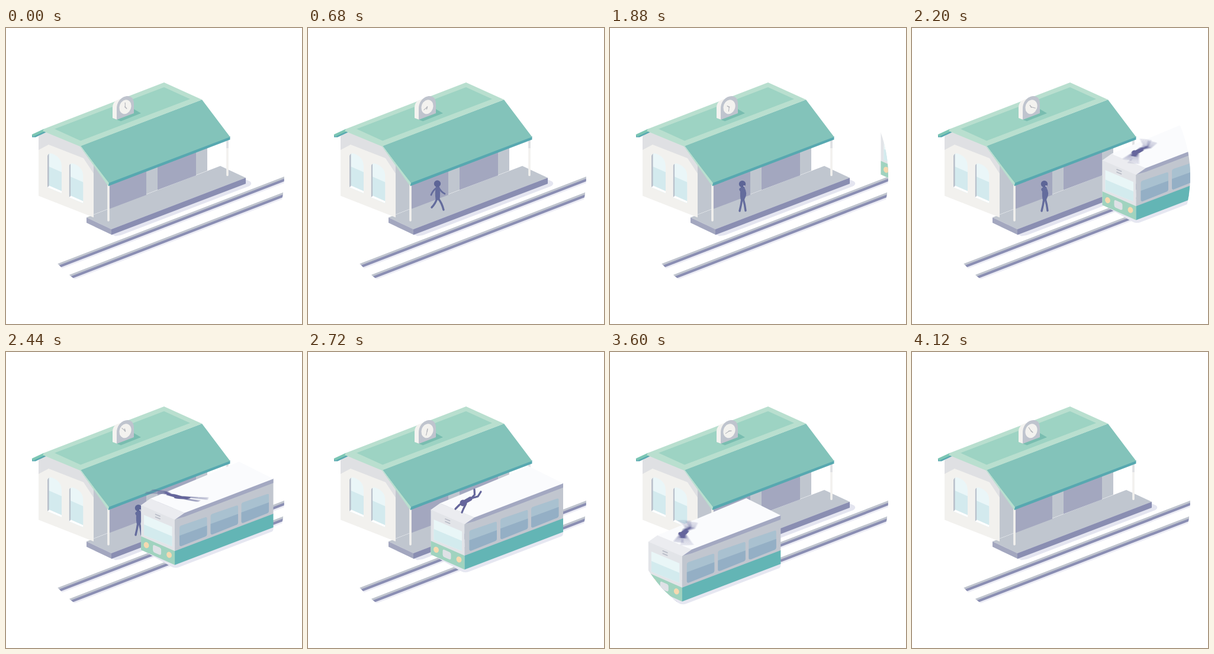
Animation of 500x500 px, one loop 4160 ms. Source, as an HTML page:

```html
<!DOCTYPE html>
<html lang="en">
<head>
<meta charset="utf-8">
<title>Little station</title>
<style>
  html, body { margin: 0; width: 100%; height: 100%; overflow: hidden; background: #fff; }
  svg { display: block; width: 100vw; height: 100vh; }
  .limb { fill: none; stroke-linecap: round; stroke-linejoin: round; }
  #spin { isolation: isolate; }
  #spin use { mix-blend-mode: plus-lighter; }
</style>
</head>
<body>
<svg viewBox="0 0 500 500">
  <defs>
    <clipPath id="disc"><circle cx="250" cy="250" r="220"/></clipPath>
    <clipPath id="door"><rect x="174" y="230" width="90" height="90"/></clipPath>
    <clipPath id="arch"><path id="archPath" d="M70 216Q72 211 77 212Q93 217 94 233V279L70 269Z"/></clipPath>
    <g id="window" clip-path="url(#arch)">
      <path fill="#eaf6f8" d="M70 205H95V282H70Z"/>
      <path fill="#d3eaee" d="M70 233L95 244V282L70 272Z"/>
      <path fill="#fff" d="M70 265L95 276V283H70Z"/>
      <path fill="#b9c0cb" d="M70 208H72.6V267L70 269Z"/>
    </g>
    <g id="sidePane">
      <path fill="#a9c1d0" d="M275 301L316 287Q319 286 319 289V315Q319 318 316 319.500L276 335.500Q272.500 336.500 272.500 333V304.500Q272.500 302 275 301Z"/>
      <path fill="#94afc5" d="M272.500 318L319 301V315Q319 318 316 319.500L276 335.500Q272.500 336.500 272.500 333Z"/>
    </g>
    <g id="dancer" class="limb" stroke="#5a628f" stroke-width="3.200">
      <path d="M275 248L281.500 241L281 232M276 247L287 244L292 236"/>
      <path d="M264 253L256 258L249 265M267 256L262.500 265L260 271"/>
      <path stroke-width="7" d="M266 252.500L274 248"/>
      <circle cx="262" cy="255" r="5.500" fill="#5a628f" stroke="none"/>
    </g>
  </defs>

  <g clip-path="url(#disc)">
    <path fill="#e4e5f0" d="M150 336L185 351.500L194 350L411 267Q417 263 412 259L400 254Z"/>
    <g id="rails"></g>
  </g>

  <!-- platform and walls -->
  <path fill="#c0c6cf" d="M136 320L362 233L405 253L178 340Z"/>
  <path fill="#a3a7bf" d="M136 320L178 340V349L136 329Z"/>
  <path fill="#8a8eb2" d="M178 340L405 253V263L178 349.500Z"/>
  <path fill="#f2f1ee" d="M55 183L65 175L126 199L148 235V320L55 283.500Z"/>
  <path fill="#dfe0e3" d="M55 183L65 175L126 199L150 235V249L131 220L72 197L55 206Z"/>
  <path fill="#c0c6cf" d="M148 228L173 258L340 195V241L148 315Z"/>
  <path fill="#a3a7bf" d="M175 262L237 238V282L175 305.500ZM256 231L321 206V249L256 273.500Z"/>
  <use href="#window"/>
  <use href="#window" x="36.500" y="17"/>

  <g id="walker" clip-path="url(#door)"></g>

  <g stroke-width="3.600" class="limb">
    <path stroke="#f2f1ee" d="M173 262V325M374 186V248.500"/>
    <path stroke="#dfe0e3" stroke-linecap="butt" d="M374 186V203"/>
  </g>

  <!-- roof -->
  <path fill="#57a8b0" d="M44 181L64 172L70 175L50 184.500H44Z"/>
  <path fill="#7cc6b4" d="M43.500 180L64 170.500L67 174L46 183.500Z"/>
  <path fill="#57a8b0" d="M173 261L378.500 183V188.500L173 267Z"/>
  <path fill="#83c3ba" d="M126 199L331 121L378.500 184L173 262Z"/>
  <path fill="#b9dfcf" d="M64 170.500L267 92L331 121L126 199.500L174 262L172.500 267L125 200L62 174Z"/>
  <path fill="#9dd3c3" d="M82 170.500L267 100L311 120L126 190.500Z"/>

  <!-- clock -->
  <path fill="#79bdb0" d="M185 154L216 137L228 144L194 157.500Z"/>
  <path fill="#f4f3f0" d="M180 152L188 155V136L194 119.500L185 123Q180 128 180 134Z"/>
  <path fill="#bfc4ce" d="M187 155V136C187 124 196 115 205.500 115C212 115 216 120 216 128V144Z"/>
  <ellipse cx="201.500" cy="133.200" rx="9.800" ry="12.200" transform="rotate(20 201.500 133.200)" fill="#f3f2ef"/>
  <g class="limb" stroke="#b3b5bb">
    <path id="minute" stroke-width="1.100" d="M201.300 134V126.200"/>
    <path id="hour" stroke-width="1.500" d="M201.300 134V130"/>
  </g>

  <g clip-path="url(#disc)">
    <g id="train">
      <path fill="#e6e7f1" d="M209 342L258 370Q265 374 272 371L429 311Q432 309 431 299Z"/>
      <path fill="#e2e4e8" d="M207.500 266L264.500 290V367L207.500 342Z"/>
      <path fill="#a0d3bf" d="M207.500 319L264.500 344V367.500L207.500 342Z"/>
      <path fill="#e9f6f7" d="M212.500 283L260 303V336L212.500 317Z"/>
      <path fill="#d3ebee" d="M212.500 299L260 319V336L212.500 317Z"/>
      <g fill="#f6d9b0">
        <ellipse cx="216.500" cy="334" rx="4.300" ry="5.200" transform="rotate(-20 216.500 334)"/>
        <ellipse cx="255" cy="350.500" rx="4.300" ry="5.200" transform="rotate(-20 255 350.500)"/>
      </g>
      <path fill="#dfe1e6" d="M230 334L238 337.500Q241.500 339 241.500 342V348Q241.500 351.500 238 350L230 346.500Q227.500 345 227.500 342V337Q227.500 333 230 334Z"/>
      <path fill="#c1c6cf" d="M264.500 290L281 279L431 222V282L264.500 345Z"/>
      <path fill="#63b5b5" d="M264.500 344L431 281V304L264.500 367.500Z"/>
      <use href="#sidePane"/>
      <use href="#sidePane" x="52.500" y="-19.800"/>
      <use href="#sidePane" x="104.500" y="-39.300"/>
      <path fill="#a3a8c1" d="M264.500 290.500L281 279L431 221.500V229L281 286Z"/>
      <path fill="#ebecf0" d="M207.500 266.500L223 255.500L281 279.500L264.500 291Z"/>
      <path fill="#fafbfd" d="M223 255.500L373 193L431 222L281 279.500Z"/>
      <path class="limb" stroke="#b9bdc8" stroke-width="1.800" d="M232 282L239.500 285.200M232 286.500L239.500 289.700"/>
      <g id="spin"></g>
    </g>
  </g>
</svg>

<script>
const LOOP = 4160, STEP = 40, SLOPE = 0.378, BLURS = 14;
const NS = 'http://www.w3.org/2000/svg';
const $ = id => document.getElementById(id);

function add(parent, tag, attrs) {
  const el = document.createElementNS(NS, tag);
  for (const k in attrs) el.setAttribute(k, attrs[k]);
  return parent.appendChild(el);
}
const clamp = v => Math.max(0, Math.min(1, v));
const smooth = (t, a, b) => { const k = clamp((t - a) / (b - a)); return k * k * (3 - 2 * k); };
const mix = (a, b, k) => a.map((v, i) => v + (b[i] - v) * k);

// Each rail: x and y of its two top ends, then shadow, side and top bands.
for (const [x1, y1, x2, y2] of [[80, 401, 478, 248], [99, 420, 478, 273.8]]) {
  for (const [from, to, fill] of [[6, 11, '#ececf5'], [3, 8, '#8a8eb3'], [0, 3.5, '#bfc4ce']]) {
    add($('rails'), 'path', { fill, d: `M${x1} ${y1 + from}L${x2} ${y2 + from}V${y2 + to}L${x1} ${y1 + to}Z` });
  }
}

// Time and distance left before the stop.
const route = [
  [1700, 327], [1880, 250], [2200, 114], [2240, 96], [2400, 34], [2520, -1], [2600, -7], [2720, 0],
  [2800, 1], [2900, 1], [3100, -2], [3260, -10], [3360, -26], [3520, -90], [3700, -220], [3900, -390]
];
function trainAt(t) {
  const last = route.length - 1;
  if (t < route[0][0] || t >= route[last][0]) return null;
  const i = route.findIndex(p => p[0] > t) - 1;
  const tangent = j => {
    const a = route[Math.max(0, j - 1)], b = route[Math.min(last, j + 1)];
    return (b[1] - a[1]) / (b[0] - a[0]);
  };
  const [t0, p0] = route[i], [t1, p1] = route[i + 1];
  const h = t1 - t0, k = (t - t0) / h, k2 = k * k, k3 = k2 * k;
  return (2 * k3 - 3 * k2 + 1) * p0 + (k3 - 2 * k2 + k) * h * tangent(i)
       + (3 * k2 - 2 * k3) * p1 + (k3 - k2) * h * tangent(i + 1);
}

// The dancer turns in the plane of the train roof, blurred by a short shutter.
const blurs = Array.from({ length: BLURS }, () =>
  add($('spin'), 'use', { href: '#dancer', opacity: 1 / BLURS }));
function spinAt(t) {
  if (t < 2680) return -360 * ((2680 - t) / 480) ** 2;
  return t > 2760 ? 360 * ((t - 2760) / 600) ** 2 : 0;
}
function drawSpin(t) {
  blurs.forEach((el, i) => {
    const a = spinAt(t + ((i + 0.5) / BLURS - 0.5) * 15);
    el.setAttribute('transform',
      `translate(268 251.5) matrix(.935 -.353 .925 .381 0 0) rotate(${a}) ` +
      `matrix(.5582 .5171 -1.3551 1.3698 0 0) translate(-268 -251.5)`);
  });
}

// Limbs: root, joint and tip, measured from the middle of the hips.
const legFront = [1, 0, 7, 7, 10, 19], legBack = [-1, 0, -4, 9, -10, 15];
const armFront = [2, -18, 6, -11, 12, -8], armBack = [-2, -18, -8, -14, -11, -6];
const stand = {
  legA: [1, 0, 4, 10, 5, 20], legB: [-1, 0, -2.5, 11, -5, 20.5],
  armA: [2, -18, 7, -9, 3, -2], armB: [-3, -18, -7, -11, -6, -5]
};
const armRaised = [-3, -17.5, -6.5, -16, -0.5, -11];

const walker = $('walker'), body = {};
const ink = '#646c9d';
for (const name of ['legB', 'armB', 'legA', 'armA'])
  body[name] = add(walker, 'path', { class: 'limb', stroke: ink, 'stroke-width': name[0] === 'l' ? 3.4 : 2.8 });
body.torso = add(walker, 'path', { fill: ink });
body.head = add(walker, 'circle', { r: 5.7, fill: '#5d6597' });
body.face = add(walker, 'ellipse', { rx: 1.3, ry: 0.9, fill: '#d3cfdf' });

function drawWalker(t) {
  const shown = t >= 160 && t < 2640;
  walker.style.display = shown ? '' : 'none';
  if (!shown) return;
  const x = Math.min(224, 219 + (t - 680) * 0.117);
  const y = 288.5 - (224 - x) * 0.09;
  const still = smooth(t, 680, 840);
  const swing = (1 - Math.cos((t - 680) / 260 * Math.PI)) / 2;
  const pose = {
    legA: mix(mix(legFront, legBack, swing), stand.legA, still),
    legB: mix(mix(legBack, legFront, swing), stand.legB, still),
    armA: mix(mix(armFront, armBack, swing), stand.armA, still),
    armB: mix(mix(armBack, armFront, swing), stand.armB, still)
  };
  pose.armB = mix(pose.armB, armRaised, smooth(t, 1200, 1440));
  for (const name in pose) {
    const p = pose[name].map((v, i) => v + (i % 2 ? y : x));
    body[name].setAttribute('d', `M${p[0]} ${p[1]}Q${p[2]} ${p[3]} ${p[4]} ${p[5]}`);
  }
  body.torso.setAttribute('d',
    `M${x - 3} ${y - 20}Q${x} ${y - 22} ${x + 3} ${y - 20}Q${x + 5} ${y - 10} ${x + 3.5} ${y + 1}` +
    `Q${x} ${y + 4} ${x - 3.5} ${y + 1}Q${x - 5} ${y - 10} ${x - 3} ${y - 20}Z`);
  body.head.setAttribute('cx', x - 0.5);
  body.head.setAttribute('cy', y - 25);
  body.face.setAttribute('cx', x + 2.5);
  body.face.setAttribute('cy', y - 21.5);
  body.face.setAttribute('opacity', still);
}

function draw(t) {
  const turn = t / LOOP * 360;
  $('minute').setAttribute('transform', `rotate(${turn * 10} 201.3 133.5)`);
  $('hour').setAttribute('transform', `rotate(${135 + turn} 201.3 133.5)`);
  drawWalker(t);
  const d = trainAt(t);
  $('train').style.display = d === null ? 'none' : '';
  if (d !== null) {
    $('train').setAttribute('transform', `translate(${d} ${-d * SLOPE})`);
    drawSpin(t);
  }
}

const start = performance.now();
function tick() {
  const t = Math.max(0, performance.now() - start) % LOOP;
  draw(Math.floor(t / STEP) * STEP);
  requestAnimationFrame(tick);
}
tick();
</script>
</body>
</html>
```
